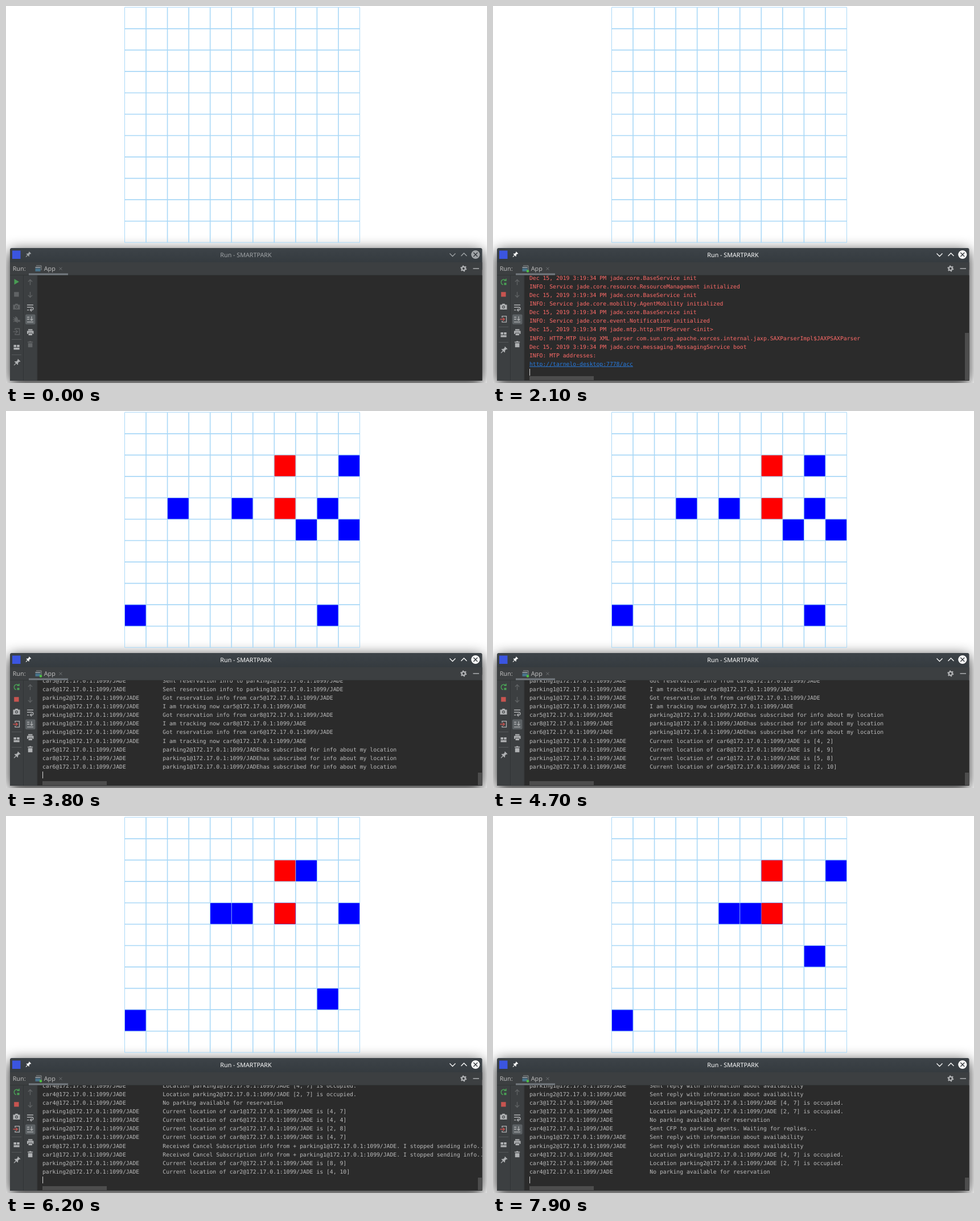
These frames come from a looping animation (845x662 px, 8000 ms). An HTML page:

```html
<!DOCTYPE html>
<html lang="en">
<head>
<meta charset="utf-8">
<title>Parking simulation</title>
<style>
  html, body { margin: 0; width: 100%; height: 100%; overflow: hidden; background: #fff; }
  #stage { position: relative; width: 845px; height: 662px; overflow: hidden; }
  #shadow { position: absolute; left: 7px; top: 425px; width: 829px; height: 233px;
    border-radius: 3px 3px 0 0; box-shadow: 0 6px 24px rgba(0, 0, 0, .9); }
  svg { position: absolute; left: 0; top: 0; }
  text { white-space: pre; text-rendering: geometricPrecision; }
  .ui { font: 10.75px "Noto Sans", sans-serif; fill: #bbb; }
  #log { font: 9.75px "DejaVu Sans Mono", monospace; }
  .out { fill: #bbb; }
  .err { fill: #ff6b68; }
  .link { fill: #287bde; text-decoration: underline; }
  .line { fill: none; stroke: currentColor; stroke-width: 1.3; }
  .icon { fill: currentColor; color: #afb1b3; }
  .dim { color: #606365; }
  #bar { color: #a0a4a7; }
  .live #bar { color: #fcfcfc; }
  .run { display: none; }
  .live .run { display: inline; }
  .live .idle { display: none; }
  .live .wake { color: #afb1b3; }
</style>
</head>
<body>
<div id="stage">
  <div id="shadow"></div>
  <svg id="view" width="845" height="662" viewBox="0 0 845 662">
    <defs>
      <linearGradient id="title" x2="0" y2="1">
        <stop stop-color="#3d4348"/><stop offset="1" stop-color="#30363a"/>
      </linearGradient>
      <clipPath id="pane"><rect x="55" y="473" width="781.5" height="184.5"/></clipPath>
      <g id="pin" transform="rotate(45)">
        <path d="M-3-6h6v1.5h-1v3.5l2 2v1h-8v-1l2-2v-3.5h-1zM-.6 2h1.2v5h-1.2z"/>
      </g>
      <g id="camera">
        <path d="M-6-3.5h3l1-1.7h4l1 1.7h3V5H-6z"/>
        <circle cy=".6" r="2.5" fill="#3c3f41"/><circle cy=".6" r="1.4"/>
      </g>
      <path id="door" class="line" d="M-2.5-2.5V-5H5V5.5H-2.5V3"/>
      <path id="enter" class="line" d="M-6 .3H1.5M-1-2.5 1.8.3-1 3.1"/>
      <path id="layout" d="M-5-4h4.5v4H-5zM.7-4H5.2v4H.7zM-5 1H5.2v3.6H-5z"/>
      <path id="arrow" class="line" d="M0 5V-4M-3.6-.8 0-4.5 3.6-.8"/>
    </defs>

    <g id="grid" fill="none" stroke="#a9d8f7"></g>
    <g id="cells"></g>

    <rect x="7" y="425" width="829.5" height="40" rx="3" fill="url(#title)"/>
    <path d="M7 450H836.5V658H7z" fill="#3c3f41"/>
    <rect x="55" y="473" width="781.5" height="184.5" fill="#2b2b2b"/>
    <path d="M30.5 473V657.5M55 473V657.5M7 472.6H836" stroke="#323537" fill="none"/>

    <rect x="11" y="429.5" width="14.5" height="14.5" fill="#3b55e0"/>
    <g id="bar">
      <g fill="currentColor"><use href="#pin" x="0" y="0" transform="translate(39 436.5) scale(.82)"/></g>
      <path class="line" d="M779.5 434.5l5 5 5-5M799.5 439l5-5 5 5"/>
      <circle cx="824.8" cy="436.5" r="7.6" fill="currentColor"/>
      <path d="M821.3 433l7 7m0-7l-7 7" stroke="#31363b" stroke-width="1.3"/>
      <text class="ui" x="421.5" y="440.5" text-anchor="middle" style="fill:currentColor">Run - SMARTPARK</text>
    </g>

    <text class="ui" x="11.7" y="465">Run:</text>
    <text class="ui" x="66.7" y="465">App</text>
    <rect x="40" y="469.5" width="69" height="3" fill="#747a80"/>
    <path d="M93.5 458.8l5 5m0-5l-5 5" stroke="#6e7173"/>
    <g class="icon">
      <path d="M53 456h9v8" class="line" style="stroke-width:1" stroke-opacity=".7"/>
      <path d="M51.5 458h9v2h-9z" fill="#8a9299"/><path d="M51.5 460.7h9v5.3h-9z" fill="#47728a"/>
      <circle class="run" cx="61" cy="465.5" r="2.3" fill="#4fc343"/>
      <circle cx="803.8" cy="461" r="3.1" class="line" style="stroke-width:2.4"/>
      <circle cx="803.8" cy="461" r="4.7" class="line" style="stroke-width:1.7" stroke-dasharray="2.2 2.72"/>
      <path d="M820.5 460.3h10.5v1.5h-10.5z"/>
    </g>

    <g class="idle icon">
      <path id="play" d="M14.5 479.3L23 484.3 14.5 489.3z"/>
      <g class="dim icon">
        <path d="M14.2 502.2h8.4v8.4h-8.4z"/>
        <use href="#camera" x="18.5" y="528"/>
        <ellipse cx="18" cy="551" rx="3" ry="4"/>
        <path class="line" d="M13 547l10 7M13 554.5l5-3M12.5 550.8h5M16 545.5l4 2M19 556l5-4m-3 0h3v3"/>
        <use href="#door" x="18.5" y="571.5"/><use href="#enter" x="18.5" y="571.5"/>
      </g>
      <path d="M10 585.5H27M10 612.5H27" stroke="#55585a"/>
      <use href="#layout" x="18.5" y="599"/>
      <use href="#pin" transform="translate(19 626)"/>
    </g>
    <g class="run icon">
      <path class="line" style="color:#499c54;stroke-width:1.6" d="M22.3 481.6A4.7 4.7 0 1 0 17.6 489.4M23 478.7v3.4h-3.6"/>
      <path d="M19.5 486h4v4h-4z" fill="#499c54"/>
      <path d="M14.2 502.2h8.4v8.4h-8.4z" fill="#c75450"/>
      <use href="#camera" x="18.5" y="528"/>
      <use href="#door" x="18.5" y="549.7"/>
      <g color="#c75450"><use href="#enter" x="18.5" y="549.7"/></g>
      <path d="M10 563.5H27M10 590.5H27" stroke="#55585a"/>
      <use href="#layout" x="18.5" y="577"/>
      <use href="#pin" transform="translate(19 604.3)"/>
    </g>
    <g class="icon">
      <g class="dim icon">
        <use href="#arrow" x="42.5" y="485"/>
        <use href="#arrow" transform="translate(42.5 507) scale(1 -1)"/>
      </g>
      <path class="line" d="M37 525h11M37 529h8.5a2.3 2.3 0 0 1 0 4.8H43M45 531.3l-2.4 2.5 2.4 2.5M37 533.8h3.5"/>
      <rect x="34" y="541.5" width="17.5" height="17.5" rx="2" fill="#5c6164"/>
      <path class="line" d="M37 546.5h4M37 550h4M37 554.8h11M45 545v7M42.6 549.6l2.4 2.5 2.4-2.5"/>
      <path d="M39 567.5h7.5v2.3H39zM37 570.5h11.5v5.3h-2v-2h-7.5v2h-2zM39.6 574.7h6.3v3.6h-6.3z"/>
      <g class="dim icon wake"><path d="M38 589.5h3v-1h3.2v1h3v1.4H38zM38.8 592h7.6v7.2h-7.6z"/></g>
    </g>

    <g clip-path="url(#pane)">
      <g id="log"></g>
      <rect id="caret" x="64" width="1.1" height="12" fill="#ccc"/>
      <rect id="hbar" x="64" y="650" width="113" height="7" fill="#a6a6a6" fill-opacity=".28"/>
      <rect id="vbar" x="829" width="7" fill="#a6a6a6" fill-opacity=".28"/>
    </g>
  </svg>
</div>
<script>
const LOOP = 8000, STEP = 15.1, CELL = 37.54, X0 = 208.5, Y0 = 2.3;
const $ = id => document.getElementById(id);

function add(parent, tag, attrs, text = "") {
  const el = document.createElementNS("http://www.w3.org/2000/svg", tag);
  for (const k in attrs) el.setAttribute(k, attrs[k]);
  el.textContent = text;
  parent.append(el);
  return el;
}

// "~c3" and "~p1" stand for agent addresses.
const expand = s => s.replace(/~([cp])(\d)/g, (_, k, n) =>
  (k === "c" ? "car" : "parking") + n + "@172.17.0.1:1099/JADE");
const say = (who, msg) => expand("~" + who).padEnd(36) + expand(msg);
const dec = s => "Dec 15, 2019 3:19:34 PM jade." + s;
const service = s => [dec("core.BaseService init"), `INFO: Service jade.core.${s} initialized`];
const at = (p, c, r, k) => say(p, `Current location of ~${c} is [${r}, ${k}]`);
const cfp = c => say(c, "Sent CFP to parking agents. Waiting for replies...");
const reply = p => say(p, "Sent reply with information about availability");
const full = c => [
  say(c, "Location ~p1 [4, 7] is occupied."),
  say(c, "Location ~p2 [2, 7] is occupied."),
  say(c, "No parking available for reservation")];
const reserved = (c, p) => say(c, `Place reserved at:~${p}`);
const sent = (c, p) => say(c, `Sent reservation info to ~${p}`);
const track = (p, c) => [say(p, `Got reservation info from ~${c}`), say(p, `I am tracking now ~${c}`)];
const follow = (c, p) => say(c, `~${p}has subscribed for info about my location`);
const cancel = c => say(c, "Received Cancel Subscription info from + ~p1. I stopped sending info...");
const rule = "-".repeat(40);

// time, centre of the last line, top of the scroll thumb, new lines
const output = [
  [1500, 481, 657, ["/usr/lib/jvm/java-8-openjdk/bin/java -Dfile.encoding=UTF-8 -classpath target/classes:lib/jade.jar App"]],
  [1600, 571.6, 657, [dec("core.Runtime beginContainer"), "INFO: " + rule.slice(6),
    "    This is JADE 4.5.0 - revision 6825 of 23-05-2017 10:06:04",
    "    downloaded in Open Source, under LGPL restrictions,", "    at http://jade.tilab.com/", rule]],
  [1700, 628.3, 505, [dec("imtp.leap.LEAPIMTPManager initialize"),
    "INFO: Listening for intra-platform commands on address:", "- jicp://172.17.0.1:1099", ""]],
  [1800, 628.3, 550, [...service("management.AgentManagement"), ...service("messaging.Messaging"),
    ...service("resource.ResourceManagement"), ...service("mobility.AgentMobility"),
    ...service("event.Notification")]],
  [2100, 628.3, 574, [dec("mtp.http.HTTPServer <init>"),
    "INFO: HTTP-MTP Using XML parser com.sun.org.apache.xerces.internal.jaxp.SAXParserImpl$JAXPSAXParser",
    dec("core.messaging.MessagingService boot"), "INFO: MTP addresses:", "http://tarnelo-desktop:7778/acc"]],
  [2300, 649, 595, [dec("core.AgentContainerImpl joinPlatform"), "INFO: " + rule.slice(2),
    "Agent container Main-Container@172.17.0.1 is ready.", rule]],
  [2400, 624.3, 618, ["c8", "c5", "c6", "c3", "c4", "c1"].map(cfp).concat(
    ["p1", "p2", "p1", "p2", "p1", "p2"].map(reply))],
  [3000, 649, 632, [reserved("c6", "p1"), reserved("c8", "p1"), reserved("c5", "p2"),
    sent("c8", "p1"), sent("c5", "p2"), sent("c6", "p1"),
    ...track("p2", "c5"), ...track("p1", "c8"), ...track("p1", "c6"), follow("c5", "p2")]],
  [3100, 624.3, 635, [follow("c8", "p1"), follow("c6", "p1")]],
  [4100, 624.3, 635, [at("p1", "c6", 4, 2), at("p1", "c8", 4, 9), at("p1", "c1", 5, 8), at("p2", "c5", 2, 10)]],
  [4900, 649, 634, [cfp("c3"), cfp("c4"), ...["p2", "p1", "p2", "p1"].map(reply)]],
  [5100, 624.3, 635, [...full("c3"), ...full("c4")]],
  [5900, 649, 634, [at("p1", "c1", 4, 7), at("p1", "c6", 4, 4), at("p2", "c5", 2, 8),
    at("p1", "c8", 4, 7), cancel("c8"), cancel("c1")]],
  [6200, 624.3, 635, [at("p2", "c7", 8, 9), at("p2", "c2", 4, 10)]],
  [7100, 624.3, 635, [at("p1", "c6", 4, 5), at("p2", "c5", 2, 7), at("p2", "c7", 7, 9), at("p2", "c2", 3, 10),
    cfp("c3"), reply("p1"), reply("p2"), ...full("c3")]],
  [7300, 624.3, 635, [cfp("c4"), reply("p1"), reply("p2"), ...full("c4")]]
];

// time, car, row, column
const moves = [
  [3000, 1, 6, 8], [3000, 2, 5, 10], [3000, 3, 4, 5], [3000, 4, 9, 0],
  [3000, 5, 1, 10], [3000, 6, 3, 2], [3000, 7, 9, 9], [3000, 8, 5, 9],
  [3600, 6, 4, 2], [3800, 1, 5, 8], [3800, 5, 2, 10], [3800, 8, 4, 9],
  [4700, 5, 2, 9], [4700, 6, 4, 3], [4900, 1, 4, 8], [4900, 8, 4, 8], [5700, 6, 4, 4],
  [5900, 1, 4, 7], [5900, 8, 4, 7], [5900, 5, 2, 8], [5900, 2, 4, 10], [5900, 7, 8, 9],
  [6700, 6, 4, 5], [7100, 5, 2, 7], [7100, 2, 3, 10], [7100, 7, 7, 9],
  [7900, 6, 4, 6], [7900, 2, 2, 10], [7900, 7, 6, 9]
];
const PRESS = 800, FOCUS = 1400, CARET_OFF = [4700, 4900];

for (let i = 0; i <= 11; i++) {
  const w = i % 11 ? 1.6 : 1, x = X0 + CELL * i, y = Y0 + CELL * i, end = CELL * 11;
  add($("grid"), "path", { d: `M${x} ${Y0}v${end}M${X0} ${y}h${end}`, "stroke-width": w });
}

const box = (row, col, fill) => add($("cells"), "rect", {
  x: X0 + CELL * col + .4, y: Y0 + CELL * row + .4, width: CELL - .8, height: CELL - .8, fill });

function drawCells(t) {
  $("cells").replaceChildren();
  if (t < moves[0][0]) return;
  const cars = {};
  for (const [when, id, row, col] of moves) if (when <= t) cars[id] = [row, col];
  for (const [row, col] of Object.values(cars)) box(row, col, "#00f");
  box(2, 7, "#f00");
  box(4, 7, "#f00");
}

function drawLog(t) {
  const done = output.filter(o => o[0] <= t);
  $("log").replaceChildren();
  for (const id of ["caret", "hbar", "vbar"]) $(id).style.display = done.length ? "" : "none";
  if (!done.length) return;
  const [, last, top] = done[done.length - 1];
  const lines = done.flatMap(o => o[3]);
  lines.slice(-13).reverse().forEach((s, i) => add($("log"), "text", {
    x: 64, y: last - STEP * i + 3.5,
    class: /^(car|parking|\/|Agent)/.test(s) ? "out" : /^http/.test(s) ? "link" : "err" }, s));
  $("caret").setAttribute("y", last + STEP - 6.3);
  if (t >= CARET_OFF[0] && t < CARET_OFF[1]) $("caret").style.display = "none";
  $("vbar").setAttribute("y", top);
  $("vbar").setAttribute("height", 657 - top);
}

function draw(t) {
  $("view").classList.toggle("live", t >= FOCUS);
  $("bar").style.color = t >= 1300 ? "#fcfcfc" : "";
  $("play").setAttribute("fill", t < PRESS ? "#499c54" : "#606365");
  drawCells(t);
  drawLog(t);
}

const times = [0, PRESS, 1300, FOCUS, ...CARET_OFF, ...output.map(o => o[0]), ...moves.map(m => m[0])];
const start = performance.now();
let shown = -1;
function tick() {
  const t = (performance.now() - start) % LOOP;
  const now = Math.max(...times.filter(x => x <= t));
  if (now !== shown) draw(shown = now);
  requestAnimationFrame(tick);
}
tick();
</script>
</body>
</html>
```
